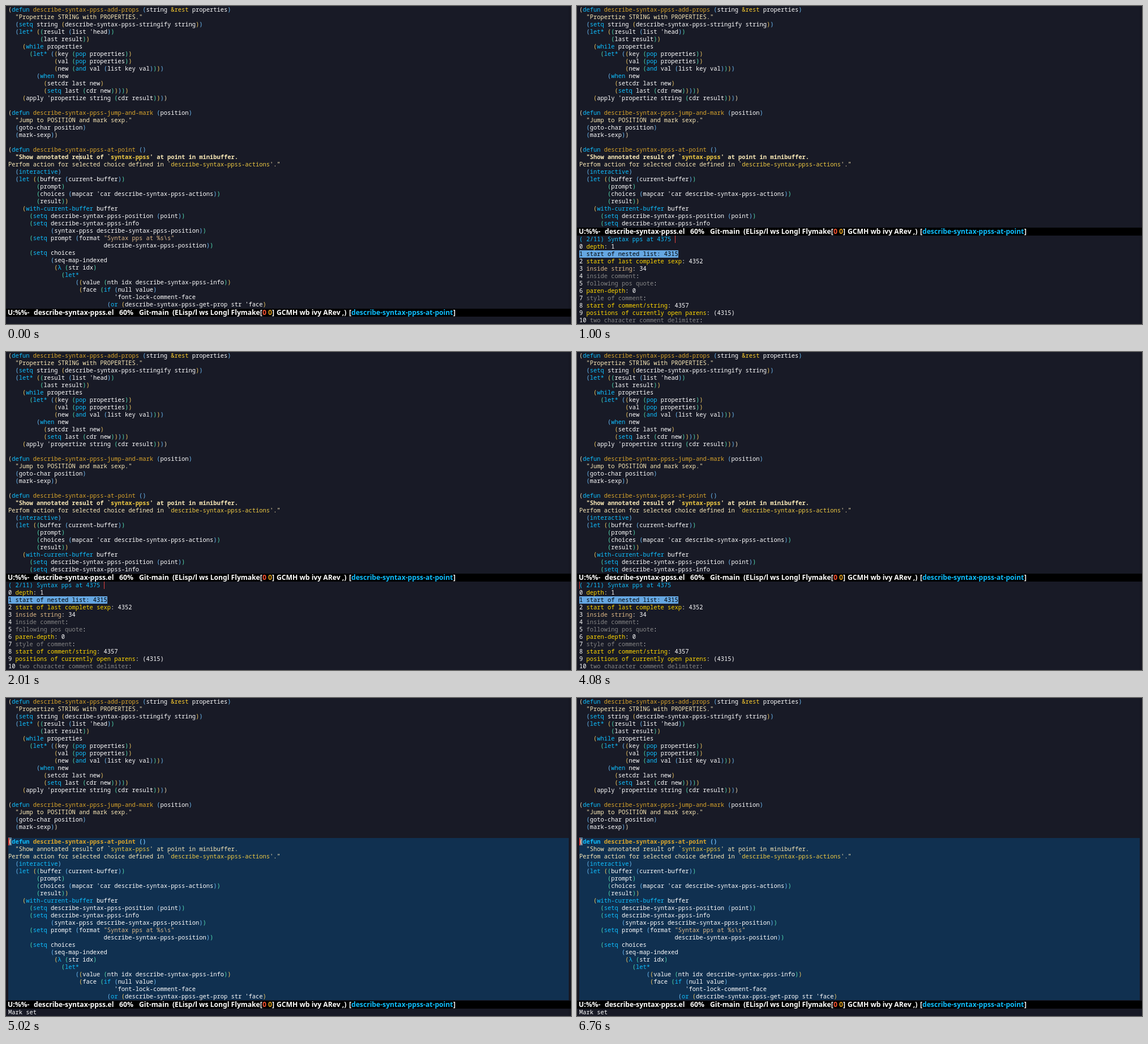
These frames come from a looping animation (998x561 px, 7920 ms). An HTML page:

```html
<!DOCTYPE html>
<html lang="en">
<head>
<meta charset="utf-8">
<title>Syntax state at point</title>
<style>
html, body { margin: 0; width: 100%; height: 100%; overflow: hidden; background: #161722; }
body { position: relative; }
pre, #back, #mode, #mode span, .cursor { position: absolute; margin: 0; white-space: pre; }
#back { left: 4px; top: 0; width: 990px; height: 100%; background: #181a26; }
pre {
  left: 4px; width: 990px; overflow: hidden; color: #fff;
  font: 500 10.41px/13px "Noto Sans Mono", "DejaVu Sans Mono", monospace;
  font-variant-ligatures: none;
}
pre div { height: 13px; }
#code { top: 0; height: 534px; }
#mode {
  left: 0; top: 534px; width: 100%; height: 14px; background: #000; color: #fff;
  font: bold 12.15px/14px "Noto Sans", "Open Sans", sans-serif;
}
#mini, #echo { top: 405px; height: 156px; display: none; }
#echo { top: 548px; height: 13px; }
.cursor { width: 1px; height: 13px; background: #e2403c; }
.key { color: #0fbfff; }
.fun { color: #daa52b; }
.type { color: #ffd030; }
.doc { color: #fbeab8; }
.str { color: #deb887; }
.ref { color: #eec943; }
.gold { color: #ffd700; }
.null { color: #858585; }
.d0 { color: #f0dcb4; }
.d1 { color: #6cbcf6; }
.d2 { color: #f0c862; }
.d3 { color: #50dcb0; }
.pick { display: inline-block; height: 13px; background: #65a7e2; color: #000; }
.s0 .row20, .s1 .row20, .s2 .row20, .s3 .row19 { font-weight: bold; }
.s1 #code, .s2 #code { height: 390px; }
.s1 #mode, .s2 #mode { top: 391px; }
.s1 #mini, .s2 #mini, .s3 #echo { display: block; }
.s3 .region { background: #103050; }
.s3 .row19 > :first-child { background: #5a7a94; }
.s0 .cursor { left: 129px; top: 260px; background: #a9a9a9; }
.s1 .cursor { left: 173px; top: 405px; }
.s2 .cursor { left: 4px; top: 405px; }
.s3 .cursor { left: 4px; top: 247px; width: 2px; }
</style>
</head>
<body class="s0">
<div id="back"></div>
<pre id="code">(defun describe-syntax-ppss-add-props (string &amp;rest properties)
  "Propertize STRING with PROPERTIES."
  (setq string (describe-syntax-ppss-stringify string))
  (let* ((result (list 'head))
         (last result))
    (while properties
      (let* ((key (pop properties))
             (val (pop properties))
             (new (and val (list key val))))
        (when new
          (setcdr last new)
          (setq last (cdr new)))))
    (apply 'propertize string (cdr result))))

(defun describe-syntax-ppss-jump-and-mark (position)
  "Jump to POSITION and mark sexp."
  (goto-char position)
  (mark-sexp))

(defun describe-syntax-ppss-at-point ()
  "Show annotated result of `syntax-ppss' at point in minibuffer.
Perfom action for selected choice defined in `describe-syntax-ppss-actions'."
  (interactive)
  (let ((buffer (current-buffer))
        (prompt)
        (choices (mapcar 'car describe-syntax-ppss-actions))
        (result))
    (with-current-buffer buffer
      (setq describe-syntax-ppss-position (point))
      (setq describe-syntax-ppss-info
            (syntax-ppss describe-syntax-ppss-position))
      (setq prompt (format "Syntax pps at %s\s"
                           describe-syntax-ppss-position))
      (setq choices
            (seq-map-indexed
             (λ (str idx)
               (let*
                   ((value (nth idx describe-syntax-ppss-info))
                    (face (if (null value)
                              'font-lock-comment-face
                            (or (describe-syntax-ppss-get-prop str 'face)</pre>
<div id="mode"></div>
<pre id="mini"></pre>
<pre id="echo">Mark set</pre>
<div class="cursor"></div>
<script>
const $ = id => document.getElementById(id);
const span = (cls, text) => `<span class="${cls}">${text}</span>`;

// Colour the Lisp code: strings, parens by depth, names and keywords.
const lexer = /"[^"]*"|[()]|(?<=defun )\S+|&rest|(?<=\()(?:defun|setq|let\*?|while|pop|and|when|interactive|with-current-buffer|λ|if|or)(?=[\s)])/g;
const depthClass = d => 'd' + (d === 1 ? 0 : (d - 2) % 3 + 1);
let depth = 0;

function colour(token) {
  if (token === '(') return span(depthClass(++depth), token);
  if (token === ')') return span(depthClass(depth--), token);
  if (token[0] === '"') {
    const cls = depth === 1 ? 'doc' : 'str';
    return token.split('\n')
      .map(line => span(cls, line.replace(/`(.+?)'/g, (_, name) => '`' + span('ref', name) + "'")))
      .join('\n');
  }
  if (token === '&rest') return span('type', '&amp;rest');
  return span(token.startsWith('describe-') ? 'fun' : 'key', token);
}

$('code').innerHTML = $('code').textContent.replace(lexer, colour).split('\n')
  .map((line, i) => `<div class="row${i}${i > 18 ? ' region' : ''}">${line}</div>`).join('');

$('mode').innerHTML = [
  [3, 'U:%%-'], [49, 'describe-syntax-ppss.el'], [200, '60%'], [235, 'Git-main'],
  [294, '(ELisp/l ws Longl Flymake['], [453, '0', '#ff5533'], [463, '0', '#e0a020'], [470, ']'],
  [478, 'GCMH wb ivy ARev ,)'], [606, '['],
  [610, 'describe-syntax-ppss-at-point', '#0fbfff'], [790, ']']
].map(([x, text, ink = '#fff']) => `<span style="left:${x}px;color:${ink}">${text}</span>`).join('');

const choices = [
  ['gold', 'depth', '1'], ['pick', 'start of nested list', '4315'],
  ['gold', 'start of last complete sexp', '4352'], ['str', 'inside string', '34'],
  ['null', 'inside comment', ''], ['null', 'following pos quote', ''],
  ['gold', 'paren-depth', '0'], ['null', 'style of comment', ''],
  ['gold', 'start of comment/string', '4357'],
  ['gold', 'positions of currently open parens', '(4315)'],
  ['null', 'two character comment delimiter', '']
];
$('mini').innerHTML = `<div class="key">( 2/11) Syntax pps at 4375 </div>` +
  choices.map(([cls, label, value], i) => {
    const line = cls === 'pick'
      ? span(cls, `${i} ${label}: ${value}`)
      : `${i} ${span(cls, label)}: ${value}`;
    return `<div>${line}</div>`;
  }).join('');

const changes = [1000, 2680, 5020], loop = 7920;
let start;
function draw(now) {
  start ??= now;
  const t = (now - start) % loop;
  document.body.className = 's' + changes.filter(c => t >= c).length;
  requestAnimationFrame(draw);
}
requestAnimationFrame(draw);
</script>
</body>
</html>
```
